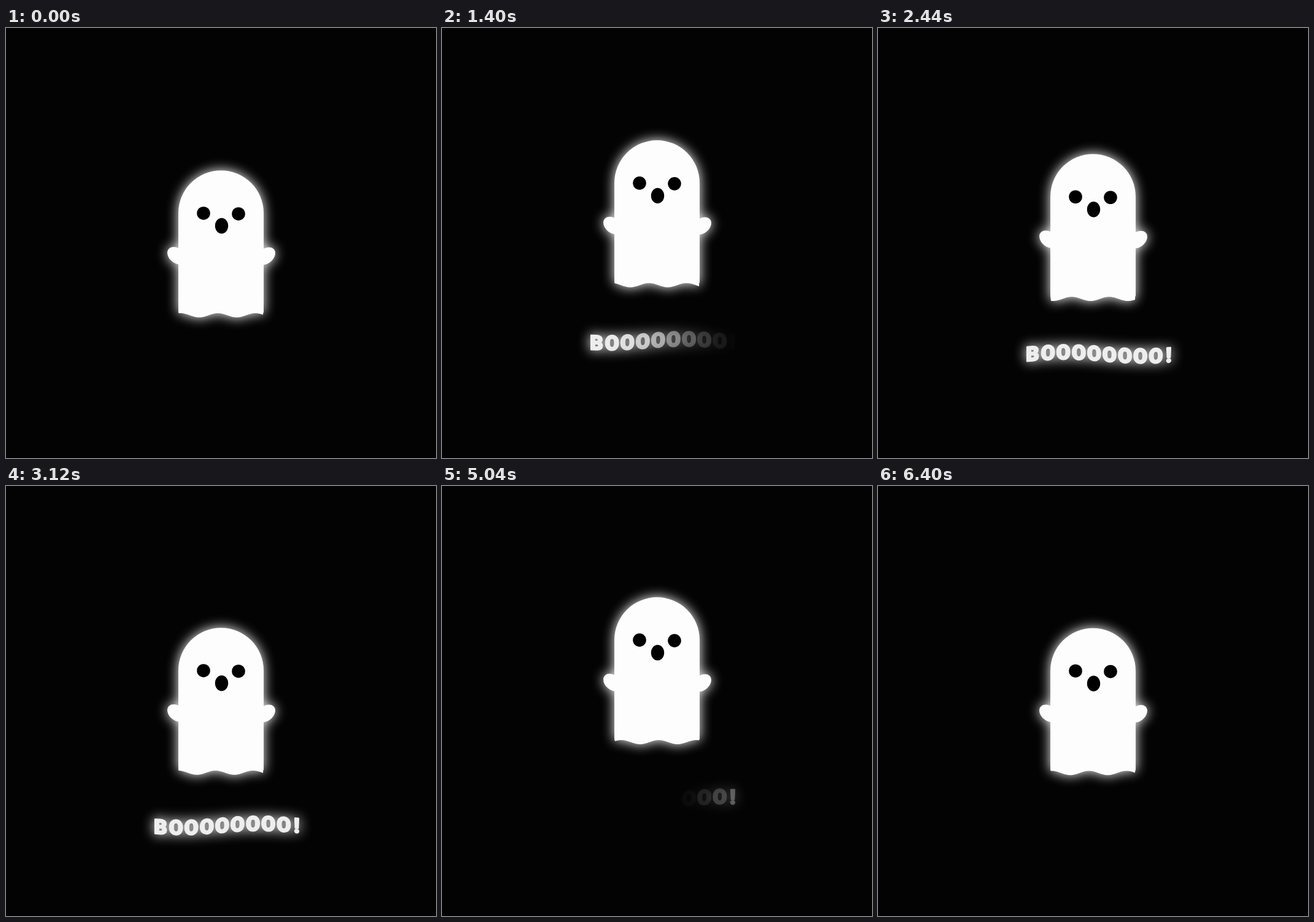
These frames come from a looping animation (701x701 px, 6.44 s). An HTML page:

```html
<!DOCTYPE html>
<html lang="en">
<head>
<meta charset="utf-8">
<title>Boo</title>
<style>
  html, body { margin: 0; width: 100%; height: 100%; overflow: hidden; background: #030303; }
  svg { display: block; width: 100vw; height: 100vh; }
  .glow { filter: drop-shadow(0 0 10px #fff); }
  text {
    font: 900 33px Roboto, "Open Sans", sans-serif;
    text-anchor: middle;
    fill: #eee;
    stroke: #eee;
    stroke-width: 2.4px;
    stroke-linejoin: round;
  }
</style>
</head>
<body>
<svg viewBox="0 0 701 701">
  <rect y="700" width="701" height="1"/>
  <g id="ghost">
    <g class="glow" fill="#fdfdfd">
      <ellipse rx="17" ry="12" transform="translate(278.2 371.2) rotate(40)"/>
      <ellipse rx="17" ry="12" transform="translate(423.8 371.8) rotate(-40)"/>
      <path id="body"/>
    </g>
    <circle cx="322" cy="302" r="10.8"/>
    <circle cx="379" cy="303" r="10.8"/>
    <ellipse cx="351.5" cy="322.5" rx="10.7" ry="12.7"/>
  </g>
  <g id="word" class="glow"></g>
</svg>
<script>
const LOOP = 6440, STEP = 40, WAVE = LOOP / 4, TAU = Math.PI * 2;
const ghost = document.getElementById('ghost');
const body = document.getElementById('body');
const word = document.getElementById('word');

const letters = [...'BOOOOOOOO!'].map((char, i) => {
  const el = document.createElementNS('http://www.w3.org/2000/svg', 'text');
  el.textContent = char;
  word.append(el);
  return { el, x: i === 9 ? 473.8 : 252 + 25.1 * i };
});

const clamp = v => Math.min(1, Math.max(0, v));
const ease = q => Math.sin(Math.PI / 2 * q ** 1.1) ** 2;
const bob = (t, mid, amp, lag, period) => mid + amp * Math.cos(TAU * (t - lag) / period);

// Domed body whose hem is a travelling sine wave.
function bodyPath(t) {
  let d = 'M281 464V301.7A69.5 69.5 0 0 1 420 301.7V464L419.3 464';
  for (let x = 419; x >= 282; x -= 1) {
    const phase = TAU * ((x - 315) / 61 - t / WAVE);
    d += `L${x} ${(468.4 + 3.4 * Math.cos(phase)).toFixed(2)}`;
  }
  return d + 'Z';
}

// Each letter fades in, holds, then fades out, one after another.
function letterAlpha(t, i) {
  const delay = 103 * i, fade = 1030;
  const shown = clamp((t - 370 - delay) / fade);
  const hidden = clamp((t - 3525 - delay) / fade);
  return ease(Math.min(shown, 1 - hidden));
}

function draw(t) {
  ghost.setAttribute('transform', `translate(0 ${bob(t, -26, 26, 25, 3240)})`);
  body.setAttribute('d', bodyPath(t));
  const mid = bob(t, 531, 23, 10, 3225);
  letters.forEach(({ el, x }, i) => {
    const phase = TAU * ((x - 395) / 250 - (t - 1400) / WAVE);
    const y = mid + 11.7 - 3.2 * Math.cos(phase);
    const slope = 3.2 * TAU / 250 * Math.sin(phase);
    el.setAttribute('transform', `matrix(1 ${slope} 0 1 ${x} ${y})`);
    el.setAttribute('opacity', letterAlpha(t, i));
  });
}

const start = performance.now();
function tick() {
  const t = (performance.now() - start) % LOOP;
  draw(Math.floor(t / STEP) * STEP);
  requestAnimationFrame(tick);
}
tick();
</script>
</body>
</html>
```
